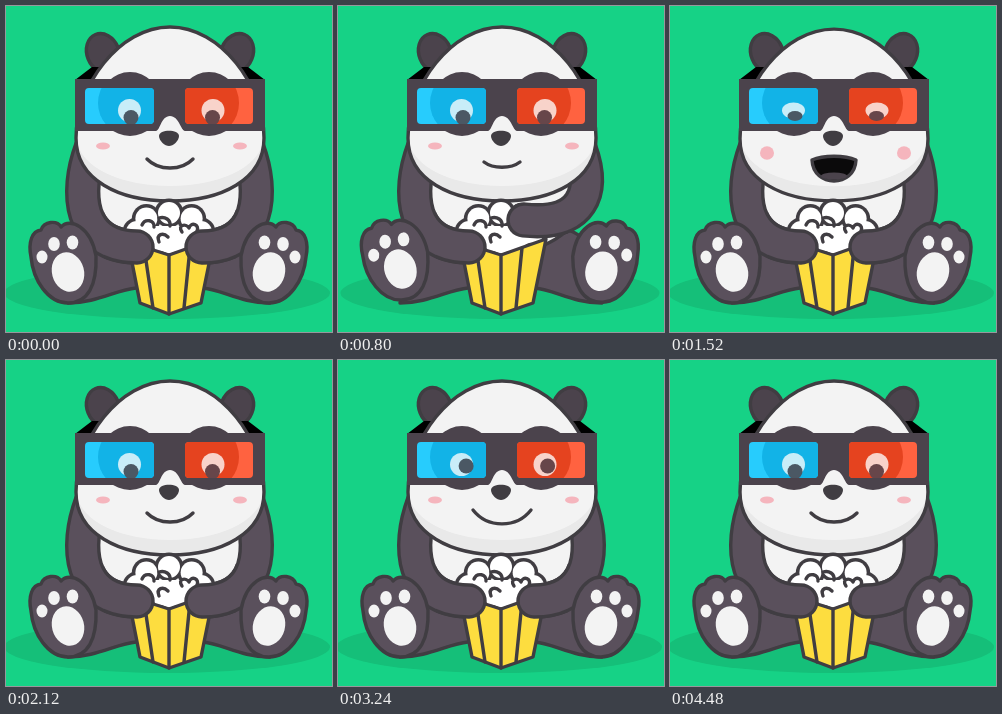
Recreate the animation shown at these times as an HTML page. Size 326 px wide and 326 px high, loop 4.52 s.

```html
<!DOCTYPE html>
<html lang="en">
<head>
<meta charset="utf-8">
<title>Panda at the movies</title>
<style>
  html, body { margin: 0; width: 100%; height: 100%; overflow: hidden; background: #16d286; }
  svg { display: block; width: 100%; height: 100%; }
  .line { stroke: #403d42; stroke-width: 3.4; stroke-linecap: round; stroke-linejoin: round; }
  .fur { fill: #5a505c; }
  .dark { fill: #4b434c; }
  .white { fill: #f3f3f3; }
  .none { fill: none; }
  .arm { fill: none; stroke-linecap: round; stroke: #403d42; stroke-width: 35.4; }
  .arm + .arm { stroke: #5a505c; stroke-width: 28.6; }
</style>
</head>
<body>
<svg viewBox="0 0 326 326">
  <defs>
    <clipPath id="lenses">
      <rect x="79" y="82" width="69" height="36" rx="4"/>
      <rect x="179" y="82" width="68" height="36" rx="4"/>
    </clipPath>
    <clipPath id="front"><rect id="frontBox" x="98" height="160"/></clipPath>
    <path id="skullShape" d="M164 21C215 21 258 80 258 132C258 174 215 195 164 195C113 195 70 174 70 132C70 80 113 21 164 21Z"/>
    <g id="arms">
      <g transform="translate(327 0) scale(-1 1)"><path class="arm left"/><path class="arm left"/></g>
      <g id="bite" fill="#fff">
        <circle class="line" cx="179" cy="171" r="5"/>
        <circle class="line" cx="171" cy="170" r="5"/>
      </g>
      <g><path class="arm right"/><path class="arm right"/></g>
    </g>
    <g id="foot">
      <path class="fur line" d="M25 251C22 236 26 225 35 224C38 215 51 214 55 221C64 211 85 221 90 250C91 279 82 297 62 297C42 297 27 274 25 251Z"/>
      <g class="white">
        <ellipse cx="62" cy="266" rx="16" ry="20" transform="rotate(-15 62 266)"/>
        <ellipse cx="36" cy="251" rx="5.5" ry="6.5"/>
        <ellipse cx="48" cy="238" rx="5.8" ry="7"/>
        <ellipse cx="66.500" cy="236.500" rx="5.8" ry="7"/>
      </g>
    </g>
  </defs>

  <ellipse id="shadow" cy="287" ry="26" fill="#15bf79"/>
  <path class="fur line" d="M78 240C90 205 238 205 250 240L264 297C235 297 217 284 197 282H130C110 284 90 297 62 297Z"/>
  <ellipse class="white line" cx="165" cy="185" rx="83" ry="62"/>
  <use href="#arms"/>
  <g id="footL"><use href="#foot"/></g>
  <g id="footR"><use href="#foot" transform="translate(323 0) scale(-1 1)"/></g>

  <g id="head">
    <ellipse id="ear" class="dark line" cx="97" cy="47" rx="16" ry="20"/>
    <ellipse class="dark line" cx="231" cy="47" rx="16" ry="20" transform="rotate(22 231 47)"/>
    <path d="M69 74L86 61H98V74ZM259 74L242 61H230V74Z"/>
    <g id="skull">
      <use href="#skullShape" class="white"/>
      <path fill="#e9e9e9" d="M70 132C78 196 250 196 258 132C258 174 215 195 164 195C113 195 70 174 70 132Z"/>
      <use href="#skullShape" class="none line"/>
    </g>
    <g class="dark">
      <ellipse cx="124" cy="98" rx="31" ry="32"/>
      <ellipse cx="203" cy="98" rx="31" ry="32"/>
      <path d="M69 73H259V125H179C175 125 173 110 164 110C155 110 154 125 150 125H69Z"/>
    </g>
    <g clip-path="url(#lenses)">
      <path fill="#27ccfd" d="M79 82h69v36h-69z"/>
      <path fill="#ff6240" d="M179 82h68v36h-68z"/>
      <ellipse cx="123" cy="97" rx="31" ry="32" fill="#12b3e7"/>
      <ellipse cx="203" cy="97" rx="30" ry="32" fill="#e5431f"/>
      <ellipse class="eye" cx="123.500" rx="11.5" fill="#c8edf8"/>
      <ellipse class="eye" cx="207" rx="11.5" fill="#f8d3ca"/>
      <ellipse class="pupil" rx="7.5" fill="#4b5864"/>
      <ellipse class="pupil" rx="7.5" fill="#67464a"/>
    </g>
    <path fill="#403d42" d="M153 130C153 123 173 123 173 130C173 135 167 140 163 140C159 140 153 135 153 130Z"/>
    <ellipse class="cheek" cx="97" rx="7" fill="#f5b5bd"/>
    <ellipse class="cheek" cx="234" rx="7" fill="#f5b5bd"/>
    <path id="mouth" class="line" fill="#0b0a0b"/>
    <ellipse id="tongue" class="dark" cx="164" cy="170"/>
  </g>

  <g id="corn"></g>
  <path fill="#fddd3f" class="line" d="M122 236L163 249L208 233L195 297L163 308L134 297Z"/>
  <path class="none line" d="M163 249V308M138 241L147 302M184 242L178 302"/>
  <g clip-path="url(#front)"><use href="#arms"/></g>
</svg>
<script>
const LOOP = 4520;
const $ = id => document.getElementById(id);
const set = (el, attrs) => { for (const k in attrs) el.setAttribute(k, attrs[k]); };
const setAll = (name, attrs) => document.querySelectorAll('.' + name).forEach((el, i) => set(el, attrs(i)));
const mix = (a, b, p) => a + (b - a) * p;
const clamp = p => Math.max(0, Math.min(1, p));

// Eased step from 0 to 1 between two times.
function ease(t, from, to) {
  const p = clamp((t - from) / (to - from));
  return p * p * (3 - 2 * p);
}
// Rises over a..b, stays, falls over c..d.
const swell = (t, a, b, c, d) => ease(t, a, b) - ease(t, c, d);
const pulse = p => Math.sin(Math.PI * clamp(p)) ** 2;

// Popcorn: a fan of outlined puffs merged by plain ones, then curls.
function puffs(r, fill) {
  let s = '';
  for (let a = Math.PI; a < 6.3; a += Math.PI / 4)
    s += `<circle cx="${163 + 32 * Math.cos(a)}" cy="${226 + 19 * Math.sin(a)}" r="${r}" fill="${fill}"/>`;
  return s;
}
$('corn').innerHTML = puffs(14.500, '#403d42') + puffs(11, '#fff') +
  '<path fill="#fff" d="M124 232L135 220H190L204 232L163 248Z"/>' +
  '<path class="none line" d="M136 219C139 212 149 214 148 221M153 212C159 210 165 214 164 220' +
  'M153 236C150 228 157 226 162 231M176 226C171 219 180 217 183 222C185 215 194 219 191 225"/>';

// Hand rises from the bucket (0) past the popcorn (1) to the mouth (2).
function armPath(lift) {
  const x = 196 - 10 * lift, y = 241 - 27 * lift;
  return `M${x} ${y}C${x + 59} ${y + 6 * lift} 258 186 242 143`;
}
setAll('left', () => ({ d: armPath(0) }));

function draw(t) {
  const raise = swell(t, 160, 380, 470, 760);
  const lift = swell(t, 40, 220, 840, 1120) + raise;
  const lean = swell(t, 40, 380, 480, 780);
  const sway = swell(t, 40, 380, 480, 1120);
  const bites = t > 980 && t < 2060 ? pulse((t - 980) % 360 / 360) : 0;
  const open = swell(t, 160, 360, 470, 660) + bites;
  const chew = swell(t, 480, 700, 1900, 2100);
  const grin = swell(t, 2500, 3160, 3960, 4440);

  set($('shadow'), { cx: 161 + 2 * sway, rx: 163 - 7 * sway });
  set($('footL'), { transform: `translate(0 ${-5.5 * sway}) rotate(${-5 * sway} 57 258)` });
  set($('footR'), { transform: `translate(2 ${-2 * sway}) rotate(${-5 * sway} 266 257)` });
  set($('head'), { transform: `translate(${-lean} 0) rotate(${-5.7 * lean} 163 95)` });

  const squash = .012 * open * (1 - 2 * lean);
  set($('skull'), { transform: `translate(0 ${195 * squash}) scale(1 ${1 - squash})` });

  const twitch = t > 2280 && t < 4480 ? pulse((t - 2280) % 550 / 390) : 0;
  set($('ear'), { transform: `rotate(${-10 * twitch} 110 65) rotate(-22 97 47)` });

  // Glance right, drift left, return.
  const lookX = 7 * swell(t, 2280, 2740, 2960, 3700) - 5 * swell(t, 2960, 3700, 3960, 4440);
  const lookY = -5.5 * swell(t, 2280, 3200, 3800, LOOP);
  setAll('eye', () => ({ cy: 104.5, ry: 11.5 - 3.5 * open }));
  setAll('pupil', i => ({
    cx: [125, 206.5][i] + lookX, cy: 111.5 + lookY - 1.5 * open, ry: 7.5 - 2.5 * open
  }));
  setAll('cheek', () => ({ cy: 140 + open * mix(7, 1, lean), ry: 3.5 + open * mix(3.2, 2, lean) }));

  // Closed lips: smile, chewing line or grin; opening parts them.
  const lips = (rest, flat, wide, agape) =>
    mix(rest + (flat - rest) * chew + (wide - rest) * grin, agape, open);
  const w = lips(23, 18, 29, 22), y = lips(153, 156, 150, 154);
  const curve = (depth, width, side) =>
    `C${164 - side * w * width} ${depth} ${164 + side * w * width} ${depth} ${164 + side * w} ${y}`;
  set($('mouth'), {
    d: `M${164 - w} ${y}` + curve(lips(165, 163, 168.5, 149), .5, 1) +
      curve(lips(165, 163, 168.5, 182), mix(.5, .95, open), -1)
  });
  set($('tongue'), { rx: 13 * open, ry: 3.5 * open * open });

  setAll('right', () => ({ d: armPath(lift) }));
  set($('frontBox'), { y: 197 - 34 * raise, width: 132 + 15 * raise });
  set($('bite'), {
    visibility: t > 160 && t < 520 ? 'visible' : 'hidden',
    transform: `translate(${10 * (2 - lift)} ${27 * (2 - lift)})`
  });
}

const start = performance.now();
function tick() {
  draw((performance.now() - start) % LOOP);
  requestAnimationFrame(tick);
}
tick();
</script>
</body>
</html>
```
